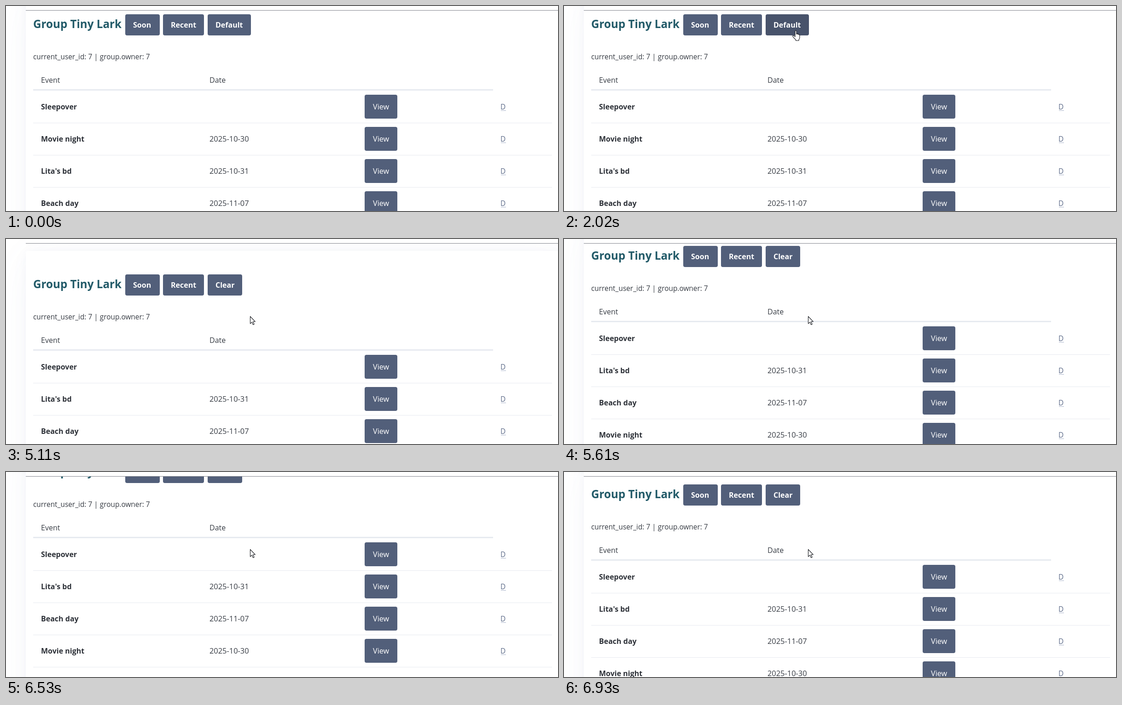
These frames come from a looping animation (1199x446 px, 8 s). An HTML page:

```html
<!DOCTYPE html>
<html lang="en">
<head>
<meta charset="utf-8">
<title>Event list</title>
<style>
html, body { margin: 0; width: 100%; height: 100%; overflow: hidden; background: #fff; }
#stage { position: relative; width: 1199px; height: 446px; overflow: hidden; }
#card {
  position: absolute; left: 43px; top: -33px; width: 1159px; height: 900px;
  border-radius: 4px; background: #fff;
  box-shadow: 1px 2px 12px rgba(129,145,181,.03), 2px 4px 22px rgba(129,145,181,.036),
    3px 7px 40px rgba(129,145,181,.043), 8px 16px 96px rgba(129,145,181,.06),
    0 0 0 .25px rgba(129,145,181,.015);
}
svg { position: absolute; left: 0; top: 0; display: block; }
text { font-family: "Open Sans", "Noto Sans", sans-serif; font-size: 16px; fill: #373c44; white-space: pre; }
.title { font-size: 24.2px; font-weight: 700; fill: #235b69; }
.info { font-size: 15.4px; }
.head { font-weight: 500; }
.name { font-weight: 700; fill: #2d3138; }
.date { font-size: 16.4px; }
.label { font-weight: 700; fill: #fff; }
.view { font-size: 16.2px; font-weight: 500; fill: #fff; }
.link { font-size: 15.4px; fill: #5d6b89; }
.button { fill: #525f7a; }
.line { fill: #e7eaf0; }
.cursor { fill: #fff; stroke: #15171c; stroke-width: 1.1; stroke-linejoin: round; }
</style>
</head>
<body>
<div id="stage">
  <div id="card"></div>
  <svg id="view" width="1199" height="446" viewBox="0 0 1199 446"></svg>
</div>
<script>
const LOOP = 8000, RELOAD = 4220, ROW_PITCH = 70.3;
const card = document.getElementById("card");
const svg = document.getElementById("view");

function add(parent, tag, attrs, content) {
  const node = document.createElementNS("http://www.w3.org/2000/svg", tag);
  for (const key in attrs) node.setAttribute(key, attrs[key]);
  if (content) node.textContent = content;
  parent.appendChild(node);
  return node;
}
const rect = (parent, cls, x, y, width, height, rx = 0) =>
  add(parent, "rect", { class: cls, x, y, width, height, rx });
const text = (parent, cls, x, y, content) => add(parent, "text", { class: cls, x, y }, content);
const show = (node, on) => node.setAttribute("display", on ? "inline" : "none");
const move = (node, x, y) => node.setAttribute("transform", `translate(${x} ${y})`);

function button(parent, x, width, label) {
  const box = rect(parent, "button", x, 18, width, 46, 4);
  const caption = text(parent, "label", x + 17, 47, label);
  return { box, caption };
}

const page = add(svg, "g", {});
text(page, "title", 59, 48, "Group Tiny Lark");
button(page, 259, 75, "Soon");
button(page, 341, 89, "Recent");
const ring = add(page, "rect", { x: 437, y: 17, width: 96, height: 48, rx: 5, fill: "none", stroke: "#525f7a", "stroke-width": 2 });
const toggle = button(page, 438, 94, "Default");
text(page, "info", 59, 116, "current_user_id: 7 | group.owner: 7");
text(page, "head", 76, 167, "Event");
text(page, "head", 442, 167, "Date");
rect(page, "line", 59, 181, 999, 3);

const events = [
  ["Sleepover", ""],
  ["Movie night", "2025-10-30"],
  ["Lita's bd", "2025-10-31"],
  ["Beach day", "2025-11-07"],
];
const rows = events.map(([name, date]) => {
  const row = add(page, "g", {});
  text(row, "name", 76, 225, name);
  text(row, "date", 442, 225, date);
  rect(row, "button", 779, 193, 71, 52, 4);
  text(row, "view", 797, 225, "View");
  text(row, "link", 1074, 225, "D");
  add(row, "rect", { x: 1075, y: 227, width: 11, height: 1, fill: "#a9b3c9" });
  rect(row, "line", 59, 254, 1127, 1);
  return row;
});
const byDate = [0, 1, 2, 3], byDefault = [0, 2, 3, 1];

// Fixed top bar
add(svg, "rect", { x: 43, y: 0, width: 1156, height: 9, fill: "#fff" });
add(svg, "rect", { x: 43, y: 9, width: 1156, height: 1, fill: "#83868e" });

const arrow = add(svg, "path", { class: "cursor", d: "M.5 .5V16.2L4.2 12.8 6.7 18.5 9.1 17.4 6.7 11.8H11.4Z" });
const hand = add(svg, "path", { class: "cursor", d: "M7 15V3.2Q7 1.5 8.5 1.5T10 3.2V9.3Q10.3 8.2 11.6 8.4T12.8 9.8Q13.2 8.8 14.2 9.1T15.2 10.5Q17 10.2 17 12V16Q17 19 15 21.2V23.3H8.5V21.4Q5 18.2 2.3 14.8 1 13.1 2.6 12.3 4.5 11.7 7 15Z" });

// Each step: [time, value...], held until the next one
const pointer = [
  [0, 0, 0, "none"], [700, 937, 298, "arrow"], [800, 907, 278, "arrow"],
  [1000, 882, 267, "arrow"], [1100, 715, 194, "arrow"], [1200, 598, 143, "arrow"],
  [1420, 592, 137, "arrow"], [1520, 573, 119, "arrow"], [1620, 546, 93, "arrow"],
  [1720, 521, 69, "arrow"], [1820, 507, 57, "hand"], [1920, 502, 53, "hand"],
  [4020, 502, 53, "arrow"], [5010, 508, 102, "hand"], [5110, 530, 168, "arrow"],
];
const scroll = [
  [0, 0], [RELOAD, 59],
  [5510, 38], [5610, -3], [5710, -33], [5830, -45],
  [6530, -40], [6630, -22], [6730, -4], [6830, 6], [6930, 9],
];
const hover = [[0, 0], [1820, .4], [1920, .8], [2020, 1], [RELOAD, 0], [5010, .6], [5110, 0]];
const focus = [[0, 0], [3710, .2], [3820, .4], [RELOAD, 0]];

const at = (steps, t) => steps.filter(step => step[0] <= t).pop().slice(1);
const mix = (from, to, k) => Math.round(from + (to - from) * k);

function render(t) {
  const reloaded = t >= RELOAD;
  const [offset] = at(scroll, t);
  const [dark] = at(hover, t);
  const [glow] = at(focus, t);
  const [x, y, shape] = at(pointer, t);

  move(page, 0, offset);
  card.style.top = offset - 33 + "px";
  (reloaded ? byDefault : byDate).forEach((id, place) => move(rows[id], 0, Math.floor(place * ROW_PITCH)));

  toggle.box.setAttribute("width", reloaded ? 75 : 94);
  toggle.box.style.fill = `rgb(${mix(82, 72, dark)},${mix(95, 83, dark)},${mix(122, 107, dark)})`;
  toggle.caption.textContent = reloaded ? "Clear" : "Default";
  ring.setAttribute("opacity", glow);

  show(arrow, shape === "arrow");
  show(hand, shape === "hand");
  move(arrow, x, y);
  move(hand, x - 7, y - 1);
}

function tick(now) {
  render(now % LOOP);
  requestAnimationFrame(tick);
}
render(0);
requestAnimationFrame(tick);
</script>
</body>
</html>
```
